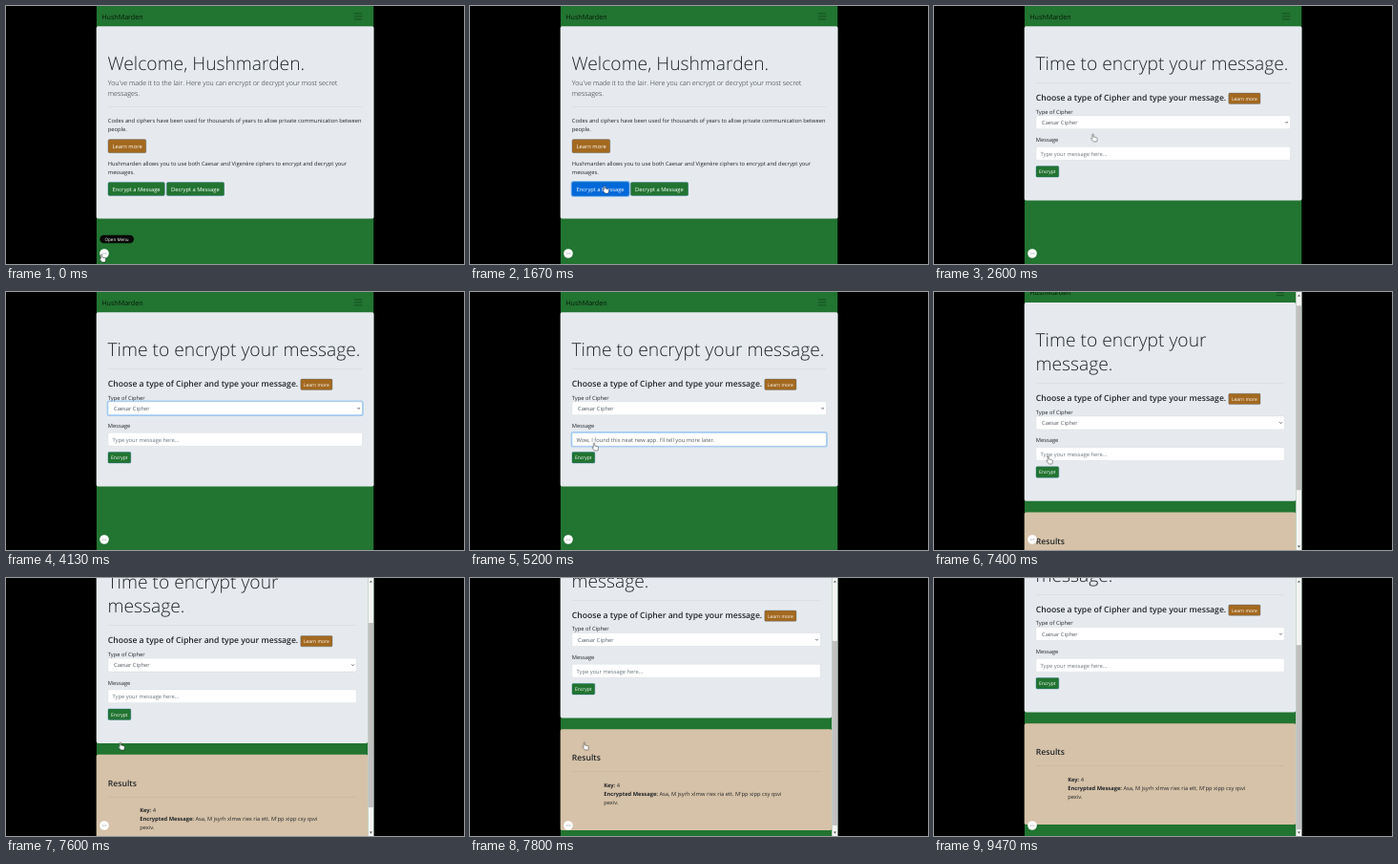
Write an HTML page that moves like this. It is 480 px wide and 270 px high and loops after 9.59 s.

```html
<!DOCTYPE html>
<html lang="en">
<head>
<meta charset="utf-8">
<title>Cipher app walkthrough</title>
<style>
@property --s { syntax: "<number>"; inherits: true; initial-value: 0; }
html, body { margin: 0; width: 100%; height: 100%; overflow: hidden; background: #000; }
svg { display: block; width: 480px; height: 270px; }
text { font: 5.76px "Open Sans", "Noto Sans", sans-serif; fill: #212529; text-rendering: geometricPrecision; white-space: pre; }

/* --d narrows the layout when the scrollbar is present */
svg { --d: 0px; --green: #227431; --brown: #a3691f; --blue: #0069d9; }
.narrow { --d: -6.2px; }
.shift { transform: translateX(var(--d)); }
.jumbo { width: calc(290.8px + var(--d)); fill: #e6eaee; }
.tan { fill: #d6c2a8; }
.full { width: calc(266.6px + var(--d)); }
.rule { height: .4px; fill: #000; fill-opacity: .11; }
.field { fill: #fff; stroke: #ced4da; stroke-width: .4; }
.icon { fill: none; stroke: #343a40; stroke-width: .7; }
.bars { stroke: #123f1b; stroke-width: .7; }

.brand { font-size: 7.13px; fill: #07170a; }
.h1 { font-size: 19.25px; font-weight: 300; }
.lead { font-size: 7.11px; font-weight: 300; }
.h4 { font-size: 8.62px; font-weight: 600; }
.b { font-weight: 700; }
.in { fill: #545b62; }
.hint { fill: #6c757d; }
.btn { stroke: #1a6a88; stroke-width: .4; fill: var(--green); }
.brown { fill: var(--brown); stroke: #58708a; }
.hot { fill: var(--blue); stroke: #0062cc; }
.lbl { fill: #fff; }
.sm { font-size: 4.98px; }
.tiptext { font-size: 4.55px; fill: #fff; text-anchor: middle; }
.ring { fill: none; stroke: #007bff; stroke-opacity: .27; stroke-width: 1.2; }
.ring.strong { stroke-opacity: .5; }
.edge { fill: none; stroke: #80bdff; stroke-width: .45; }

/* timeline */
.t { animation: 9.59s step-end infinite; }
.welcome { animation-name: welcome; }
.encrypt { animation-name: encrypt; }
.results { animation-name: results; }
.tip { animation-name: tip; }
.hover1 { animation-name: hover1; }
.ring1 { animation-name: ring1; }
.pick { animation-name: pick; }
.focus { animation-name: focus; }
.typed { animation-name: typed; }
.hover2 { animation-name: hover2; }
.ring2 { animation-name: ring2; }
.hand { animation: move 9.59s ease-in-out infinite, seen 9.59s step-end infinite; }
.scroller { animation-name: results, scroll; }
.doc { transform: translateY(calc(var(--s) * -1px)); }
.thumb { transform: translateY(calc(var(--s) * .714px)); }

@keyframes welcome { 0% { opacity: 1 } 18.74%, to { opacity: 0 } }
@keyframes encrypt { 0% { opacity: 0 } 18.74% { opacity: 1 } 65.98%, to { opacity: 0 } }
@keyframes results { 0% { opacity: 0 } 65.98%, to { opacity: 1 } }
@keyframes tip { 0% { opacity: 1 } 6.93%, to { opacity: 0 } }
@keyframes hover1 { 0% { opacity: 0 } 15.27%, to { opacity: 1 } }
@keyframes ring1 { 0% { opacity: 0 } 16.66%, to { opacity: 1 } }
@keyframes pick { 0% { opacity: 0 } 29.17% { opacity: 1 } 45.85%, to { opacity: 0 } }
@keyframes focus { 0% { opacity: 0 } 45.85% { opacity: 1 } 61.85%, to { opacity: 0 } }
@keyframes typed { 0% { opacity: 0 } 50.03%, to { opacity: 1 } }
@keyframes hover2 { 0% { opacity: 0 } 56.2%, to { opacity: 1 } }
@keyframes ring2 { 0% { opacity: 0 } 61.85%, to { opacity: 1 } }
@keyframes seen { 0% { opacity: 1 } 41.7% { opacity: 0 } 54.2% { opacity: 1 } 86.2%, to { opacity: 0 } }
@keyframes move {
  0%, 6.2% { transform: translate(100px, 260px) }
  15.9%, 22.9% { transform: translate(141px, 188px) }
  29.2%, 38.9% { transform: translate(174px, 118px) }
  42% { transform: translate(150px, 150px) }
  54.2% { transform: translate(130px, 158px) }
  57%, to { transform: translate(119.8px, 172px) }
}
@keyframes scroll {
  0% { --s: 0 }
  77.13% { --s: 10.2 }
  77.83% { --s: 24 }
  78.53% { --s: 41 }
  79.22% { --s: 56 }
  79.92% { --s: 67 }
  80.61% { --s: 76 }
  81.3% { --s: 82.5 }
  82% { --s: 85.5 }
  82.7% { --s: 87 }
  83.39% { --s: 88 }
  84.09%, to { --s: 88.5 }
}
</style>
</head>
<body>
<svg viewBox="0 0 480 270">
  <defs>
    <clipPath id="view"><rect x="94.7" width="290.8" height="270"/></clipPath>
    <g id="nav">
      <text class="brand" x="100.3" y="13.7">HushMarden</text>
      <path class="icon bars shift" d="M365 7.9h8.2M365 10.9h8.2M365 13.9h8.2"/>
    </g>
    <g id="form">
      <rect class="full rule" x="106.9" y="80.2"/>
      <text class="h4" x="106.8" y="98.7">Choose a type of Cipher and type your message.</text>
      <rect class="btn brown" x="308.8" y="91.1" width="33.2" height="11.3" rx="1.1"/>
      <text class="lbl sm" x="311.9" y="98.7">Learn more</text>
      <text x="106.8" y="112.5">Type of Cipher</text>
      <rect class="full field" x="106.9" y="114.7" height="14" rx="1.5"/>
      <text class="in" x="113" y="124.1">Caesar Cipher</text>
      <path class="icon shift" d="M368.4 121l1.3 1.4 1.3-1.4"/>
      <text x="106.8" y="142.2">Message</text>
      <rect class="full field" x="106.9" y="147.3" height="14" rx="1.5"/>
      <text class="hint" x="111.5" y="156.7">Type your message here...</text>
      <rect class="btn" x="107" y="167.6" width="23.8" height="11.4" rx="1.1"/>
      <text class="lbl sm" x="110.1" y="175.3">Encrypt</text>
    </g>
  </defs>

  <g clip-path="url(#view)">
    <rect x="94.7" width="290.8" height="270" fill="#227431"/>

    <g class="t welcome">
      <use href="#nav"/>
      <rect class="jumbo" x="94.7" y="21.2" height="201.4" rx="1.8"/>
      <text class="h1" x="106.5" y="66.8">Welcome, Hushmarden.</text>
      <text class="lead" x="106.8" y="83.1">You've made it to the lair. Here you can encrypt or decrypt your most secret</text>
      <text class="lead" x="106.8" y="94.3">messages.</text>
      <rect class="full rule" x="106.9" y="105.3"/>
      <text x="106.8" y="122.2">Codes and ciphers have been used for thousands of years to allow private communication between</text>
      <text x="106.8" y="131.2">people.</text>
      <rect class="btn brown" x="107" y="139.6" width="39.8" height="14.1" rx="1.5"/>
      <text class="lbl" x="111.6" y="148.9">Learn more</text>
      <text x="106.8" y="167.1">Hushmarden allows you to use both Caesar and Vigenère ciphers to encrypt and decrypt your</text>
      <text x="106.8" y="176.1">messages.</text>
      <rect class="btn" x="107" y="184.4" width="59.3" height="14" rx="1.5"/>
      <rect class="btn hot t hover1" x="107" y="184.4" width="59.3" height="14" rx="1.5"/>
      <rect class="ring strong t ring1" x="106.3" y="183.7" width="60.7" height="15.4" rx="2"/>
      <text class="lbl" x="111.6" y="193.7">Encrypt a Message</text>
      <rect class="btn" x="168.4" y="184.4" width="60.3" height="14" rx="1.5"/>
      <text class="lbl" x="173" y="193.7">Decrypt a Message</text>
    </g>

    <g class="t encrypt">
      <use href="#nav"/>
      <rect class="jumbo" x="94.7" y="21.2" height="182.4" rx="1.8"/>
      <text class="h1" x="106.5" y="66.8">Time to encrypt your message.</text>
      <use href="#form"/>
      <g class="t pick">
        <rect class="ring" x="106.2" y="114" width="268" height="15.4" rx="2"/>
        <rect class="edge" x="106.9" y="114.7" width="266.6" height="14" rx="1.5"/>
      </g>
      <g class="t typed">
        <rect x="108" y="148" width="262" height="12.6" fill="#fff"/>
        <text class="in" x="111.5" y="156.7">Wow, I found this neat new app. I'll tell you more later.</text>
      </g>
      <g class="t focus">
        <rect class="ring" x="106.2" y="146.6" width="268" height="15.4" rx="2"/>
        <rect class="edge" x="106.9" y="147.3" width="266.6" height="14" rx="1.5"/>
      </g>
      <g class="t hover2">
        <rect class="btn hot" x="107" y="167.6" width="23.8" height="11.4" rx="1.1"/>
        <text class="lbl sm" x="110.1" y="175.3">Encrypt</text>
      </g>
      <rect class="ring strong t ring2" x="106.3" y="166.9" width="25.2" height="12.8" rx="1.7"/>
    </g>

    <g class="t scroller narrow">
      <g class="doc">
        <use href="#nav"/>
        <rect class="jumbo" x="94.7" y="21.2" height="207.7" rx="1.8"/>
        <text class="h1" x="106.5" y="66.8">Time to encrypt your</text>
        <text class="h1" x="106.5" y="92.1">message.</text>
        <use href="#form" y="25.4"/>
        <rect class="jumbo tan" x="94.7" y="240.8" height="105.8" rx="1.8"/>
        <text class="h4" x="106.8" y="273.8">Results</text>
        <rect class="full rule" x="106.9" y="285"/>
        <text x="140.2" y="301.3"><tspan class="b">Key:</tspan> 4</text>
        <text x="140.2" y="310.3"><tspan class="b">Encrypted Message:</tspan> Asa, M jsyrh xlmw riex ria ett. M'pp xipp csy qsvi</text>
        <text x="140.2" y="319.3">pexiv.</text>
      </g>
      <rect x="379.3" width="6.2" height="270" fill="#f4f4f4"/>
      <rect class="thumb" x="379.7" y="7" width="5.4" height="193" fill="#c1c1c1"/>
      <path d="M380.9 4.6l1.5-1.8 1.5 1.8zM380.9 265.6l1.5 1.8 1.5-1.8z" fill="#505050"/>
    </g>

    <circle cx="103" cy="259" r="4.8" fill="#fff"/>
    <g fill="#777">
      <circle cx="101.2" cy="259" r=".5"/><circle cx="103" cy="259" r=".5"/><circle cx="104.8" cy="259" r=".5"/>
    </g>
    <g class="t tip">
      <rect x="98.3" y="239.8" width="35.7" height="8.4" rx="4.2" fill="#080a08"/>
      <text class="tiptext" x="116.1" y="245.6">Open Menu</text>
    </g>

    <path class="hand" fill="#fff" stroke="#000" stroke-width=".4" stroke-linejoin="round"
      d="M-.7 .6a.7 .7 0 0 1 1.4 0V3l3 .7q.9 .3 .8 1.2L4 8H.6L-2 4.9q.3-1 1.3-.2z"/>
  </g>
</svg>
</body>
</html>
```
